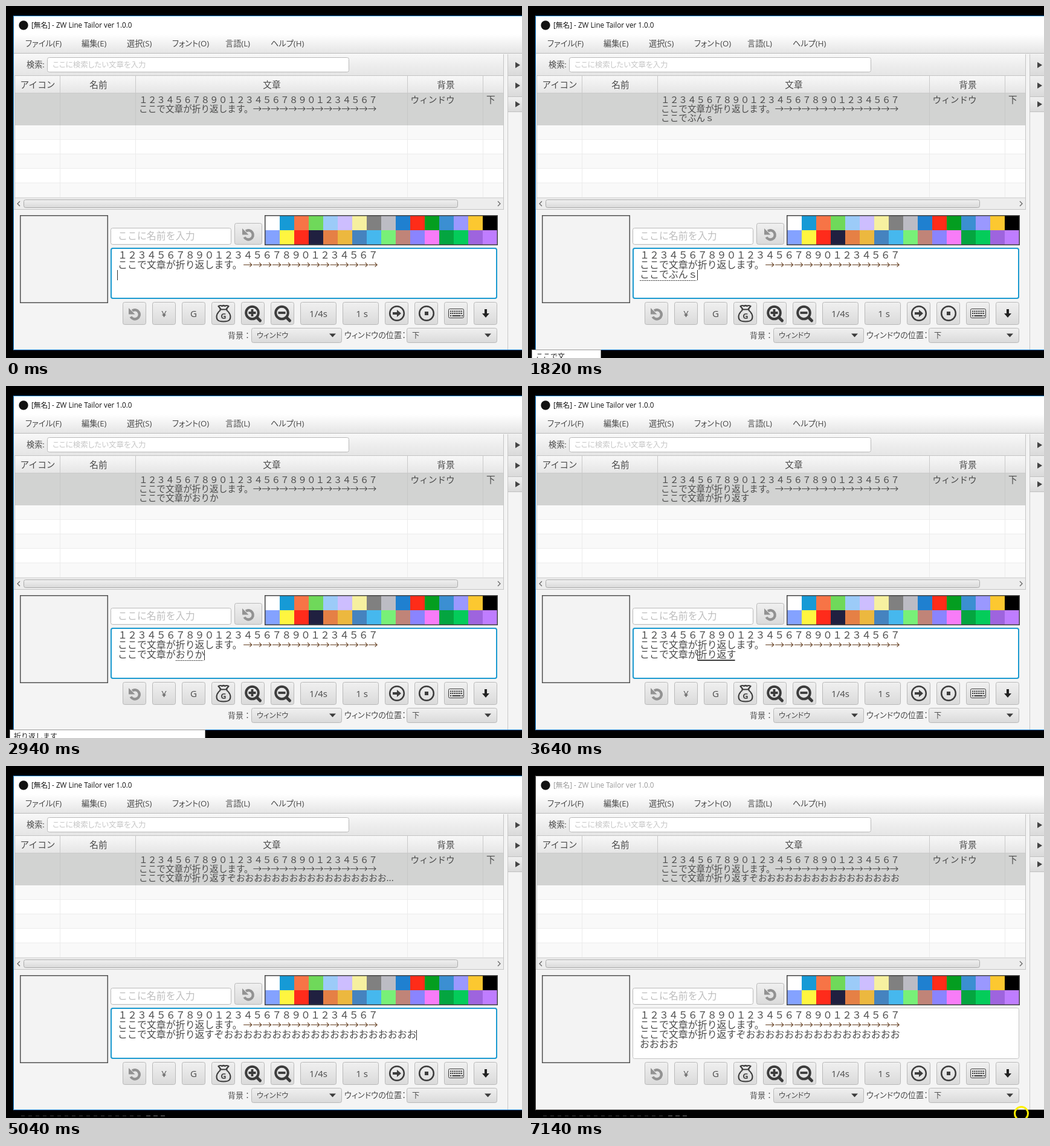
An HTML page for the animation above (7.28 s loop, 854 px wide and 584 px high).

```html
<!DOCTYPE html>
<html lang="ja">
<head>
<meta charset="utf-8">
<title>Text editor typing</title>
<style>
  html, body { margin: 0; width: 100%; height: 100%; overflow: hidden; background: #000; }
  svg { display: block; width: 854px; height: 584px; }
  text { font-family: "Noto Sans CJK JP", "Noto Sans", sans-serif; font-weight: 300; fill: #4a4a4a; white-space: pre; }
  .ui { font-family: "Open Sans", "Noto Sans CJK JP", sans-serif; font-weight: 400; font-feature-settings: "palt"; }
</style>
</head>
<body>
<svg id="stage" viewBox="0 0 854 584">
  <defs>
    <linearGradient id="bar" x2="0" y2="1"><stop stop-color="#fff"/><stop offset="1" stop-color="#e4e4e4"/></linearGradient>
    <linearGradient id="head" x2="0" y2="1"><stop stop-color="#f8f8f8"/><stop offset="1" stop-color="#e5e5e5"/></linearGradient>
    <linearGradient id="btn" x2="0" y2="1"><stop stop-color="#f0f0f0"/><stop offset="1" stop-color="#dadada"/></linearGradient>
  </defs>
</svg>
<script>
const stage = document.getElementById('stage');
const LOOP = 7280, CELL = 15.96, ROW_CELL = 14.63;
const EDGE = '#b9b9b9', INK = '#3c3c3c';

function add(tag, attrs) {
  const node = document.createElementNS('http://www.w3.org/2000/svg', tag);
  for (const key in attrs) node.setAttribute(key, attrs[key]);
  return stage.appendChild(node);
}
const box = (x, y, width, height, fill, more) => add('rect', { x, y, width, height, fill, ...more });
const frame = (x, y, w, h, fill, stroke = EDGE, rx = 3, line = 1) =>
  box(x + line / 2, y + line / 2, w - line, h - line, fill, { stroke, rx, 'stroke-width': line });
const path = (d, more) => add('path', { d, fill: 'none', stroke: INK, ...more });
const solid = (d, fill = INK) => path(d, { fill, stroke: 'none' });
const hline = (x, y, w, color) => box(x, y, w, 1, color);
const vline = (x, y, h, color) => box(x, y, 1, h, color);
function label(x, y, size, str, more = {}) {
  const node = add('text', { x, y, 'font-size': size, ...more });
  node.textContent = str;
  return node;
}
const ui = (x, y, size, str, more) => label(x, y, size, str, { class: 'ui', ...more });
const centered = { 'text-anchor': 'middle' };

// Window, title and menu
box(12, 16, 842, 555, '#f4f4f4');
box(13, 17, 841, 30, '#fff');
add('circle', { cx: 29, cy: 32, r: 7.7, fill: '#111' });
const title = ui(42, 36, 11.7, '[無名] - ZW Line Tailor ver 1.0.0');
box(13, 47, 841, 32, 'url(#bar)');
hline(13, 78, 841, '#bcbcbc');
[[32, 'ファイル(F)'], [125, '編集(E)'], [200, '選択(S)'], [275, 'フォント(O)'], [363, '言語(L)'], [438, 'ヘルプ(H)']]
  .forEach(([x, str]) => ui(x, 67, 13.2, str));

// Search
box(13, 79, 811, 36, 'url(#head)');
ui(34, 102, 13.2, '検索:');
frame(68, 85, 500, 25, '#fff');
ui(77, 102, 12.5, 'ここに検索したい文章を入力', { style: 'fill:#c6c6c6' });

// Table
box(14, 115, 809, 30, 'url(#head)');
hline(14, 115, 809, '#c4c4c4');
hline(14, 144, 809, '#c9c9c9');
box(14, 145, 809, 53, '#d2d3d2');
for (let i = 0; i < 5; i++) {
  const y = 198 + i * 24;
  box(14, y, 809, 24, i % 2 ? '#fff' : '#f9f9f9');
  hline(14, y + 23, 809, '#ededed');
}
for (const x of [89, 214, 664, 789]) {
  vline(x, 116, 29, '#c9c9c9');
  vline(x, 145, 53, '#c7c8c7');
  vline(x, 198, 120, '#ebebeb');
}
[[52.5, 'アイコン'], [153, '名前'], [440, '文章'], [728, '背景']]
  .forEach(([x, str]) => label(x, 136, ROW_CELL, str, centered));
const DIGITS = '１２３４５６７８９０１２３４５６７８９０１２３４５６７';
const SENTENCE = 'ここで文章が折り返します。', ARROWS = '→'.repeat(14);
label(220, 161, ROW_CELL, DIGITS);
label(220, 176, ROW_CELL, SENTENCE + ARROWS);
label(669.5, 161, ROW_CELL, 'ウィンドウ');
label(795, 161, ROW_CELL, '下');
const rowText = label(220, 191, ROW_CELL, '');

// Scroll bar
box(14, 318, 809, 19, '#ededed');
hline(14, 318, 809, '#d4d4d4');
hline(13, 337, 811, '#c4c4c4');
frame(29, 321, 719, 14, 'url(#btn)', '#ababab');
path('M23 324l-4 4 4 4M814 324l4 4-4 4', { stroke: '#666', 'stroke-width': 1.3 });
vline(14, 115, 223, '#c8c8c8');

// Split divider and collapsed side panels
vline(823, 80, 258, '#c4c4c4');
vline(830, 80, 490, '#c8c8c8');
for (const [y, h, mid] of [[80, 35, 98], [116, 34, 132], [151, 24, 163]]) {
  box(831, y, 23, h, 'url(#btn)');
  hline(831, y + h, 23, '#c0c0c0');
  solid(`M843 ${mid - 5}l8 5-8 5z`, '#444');
}

// Icon slot, name field and palette
frame(23, 347, 146, 146, '#f3f3f3', '#505050', 0, 1.5);
frame(173, 368, 200, 28, '#fff');
label(185, 387, CELL, 'ここに名前を入力', { style: 'fill:#bdbdbd' });
const button = (x, y, w, h) => frame(x, y, w, h, 'url(#btn)');
button(378, 360, 46, 36);
[
  'fff 169ad6 f77446 6fd95a 9ccbf8 cdbeff f6f0a0 808080 bcbcc4 1f80d0 ff2c18 049e20 3b8fd2 9a98ff fcc830 000',
  '84a2ff fff540 ff2b1b 202040 e58045 ecb83f 4583bf 46b8ee 78f078 c08478 8a84ff f87cf8 04a540 04cc5a 9e64de bf7dff'
].forEach((row, j) => row.split(' ').forEach((color, i) =>
  box(429 + i * 24, 348 + j * 24, 24, 24, '#' + color)));
frame(428, 347, 386, 50, 'none', '#444', 0, 1.5);

// Text area
const area = frame(173, 401, 640, 85, '#fff', '#c4c4c4');
const focusRing = frame(173, 401, 640, 85, 'none', '#1b9ad0', 3, 2);
label(185, 419, CELL, DIGITS);
label(185, 435, CELL, SENTENCE);
label(185 + 13 * CELL, 435, CELL, ARROWS, { style: 'fill:#6a4629' });
const line3 = label(185, 451, CELL, '');
const line4 = label(185, 467, CELL, '');
const underline = path('', {});
const caret = box(184, 438, 1, 17, '#333');

// Tool buttons
[193, 242, 291, 340, 389, 438].forEach(x => button(x, 491, 39, 38));
[487, 557].forEach(x => button(x, 491, 60, 38));
[627, 676, 725, 774].forEach(x => button(x, 491, 39, 38));
[[261.5, '¥'], [310.5, 'G'], [517, '1/4s'], [589, '1 s']]
  .forEach(([x, str]) => ui(x, 516, 15, str, centered));

function undoIcon(x, y) {
  path(`M${x - 6.5} ${y + 4.5}A7.6 7.6 0 1 0 ${x - 4} ${y - 5.5}`, { stroke: '#929292', 'stroke-width': 4.4 });
  solid(`M${x - 10} ${y - 10}v10.500h10.500z`, '#929292');
}
undoIcon(401, 379);
undoIcon(213, 511);

path('M355.500 503l-4-5q4-2 6 0 2.500-2 5 0 2-2 6 0l-4 5M353.500 503.500h13M355 504.500c-6 5-8 11-5 16q2 3 10 3t10-3c3-5 1-11-5-16',
  { 'stroke-width': 2.2, 'stroke-linejoin': 'round' });
ui(360, 518.5, 13, 'G', { ...centered, style: 'font-weight:700' });

function lens(x, sign) {
  add('circle', { cx: x, cy: 509, r: 10.3, fill: 'none', stroke: INK, 'stroke-width': 4 });
  path(`M${x + 8} 517l5 5`, { 'stroke-width': 5, 'stroke-linecap': 'round' });
  path(sign, { 'stroke-width': 3.8 });
}
lens(407.5, 'M401.500 509h12M407.500 503v12');
lens(456.5, 'M450.500 509h12');

for (const cx of [647, 696])
  add('circle', { cx, cy: 510, r: 11.8, fill: 'none', stroke: INK, 'stroke-width': 2.5 });
solid('M640 508h7v-4l7 6-7 6v-4h-7z');
box(693, 507, 6, 6, INK);
frame(732, 502, 26, 16, 'none', INK, 2);
path('M735 506.5h20M735 510h20', { 'stroke-width': 2, 'stroke-dasharray': '2 1' });
path('M735 514h2m1.500 0h14m1.500 0h2', { 'stroke-width': 2 });
solid('M792 503h4v7h4l-6 7-6-7h4z', '#222');

// Bottom selectors
function combo(x, str) {
  frame(x, 534, 150, 25, 'url(#btn)');
  ui(x + 9, 551, 12.3, str);
  solid(`M${x + 129} 543.500h11l-5.500 6z`);
}
ui(367, 551, 13, '背景：', { style: 'font-feature-settings:normal' });
combo(406, 'ウィンドウ');
ui(560, 551, 13.2, 'ウィンドウの位置：');
combo(663, '下');

// Window edge, suggestion popup, leftovers below the window
const edge = path('M854 16.500H12.500V570.500H854', {});
const popup = box(6.5, 570.5, 0, 20, '#fff', { stroke: '#999' });
const popupText = label(13, 586, 12, '', { style: 'fill:#222' });
const popupNote = label(0, 585, 10, 'ひらがな', { style: 'fill:#999' });
const specks = path('M25 580.500H226', { stroke: '#3c3c3c', 'stroke-dasharray': '6 6' });
const brightSpecks = path('M232 580.500H264', { stroke: '#777', 'stroke-dasharray': '7 5' });
const pointer = add('circle', { cx: 816.5, cy: 576.5, r: 11, fill: 'none', stroke: '#fff000', 'stroke-width': 3 });

// [start, settled text, text being composed, suggestion, popup right edge]
const A = 'ここで文章', B = A + 'が', C = B + '折り返す';
const drag = (at, n) => [at, C, 'ぞ' + 'お'.repeat(n), 'ぞ' + 'お'.repeat(Math.max(1, n - 1)), 0];
const FULL = C + 'ぞ' + 'お'.repeat(20);
const steps = [
  [0, '', ''],
  [840, '', 'ｋ'],
  [980, '', 'こ', 'こちら', 120],
  [1120, '', 'ここ', 'ここで', 304],
  [1260, '', 'ここｄ', 'ここで', 304],
  [1400, '', 'ここで', 'ここで', 120],
  [1540, '', 'ここでｂ', 'ここで', 120],
  [1680, '', 'ここでぶ', 'ここで文', 120],
  [1820, '', 'ここでぶんｓ', 'ここで文', 120],
  [1960, '', 'ここでぶんしょ', 'ここで文章', 351],
  [2100, '', 'ここでぶんしょう', 'ここで文章', 351],
  [2380, '', A],
  [2520, A, 'が'],
  [2660, B, 'お', '折り返し', 329],
  [2800, B, 'おり', '折り返し', 329],
  [2940, B, 'おりか', '折り返します', 329],
  [3080, B, 'おりかえ', '折り返します', 329],
  [3220, B, 'おりかえｓ', '折り返します', 329],
  [3360, B, 'おりかえす', '折り返す', 380],
  [3640, B, '折り返す'],
  [3780, C, 'ｚ'],
  drag(3920, 1), drag(4200, 2), drag(4340, 5), drag(4480, 9),
  drag(4620, 13), drag(4760, 17), drag(4900, 20),
  [5040, FULL, '']
];

const show = (node, on) => node.setAttribute('visibility', on ? 'visible' : 'hidden');
const set = (node, attrs) => { for (const key in attrs) node.setAttribute(key, attrs[key]); };

function render(t) {
  const [at, settled, composing, hint, right] = steps.findLast(step => step[0] <= t);
  const text = settled + composing;
  const wrapped = t >= 5320, active = t < 7140;

  line3.textContent = wrapped ? text.slice(0, 27) : text;
  line4.textContent = wrapped ? text.slice(27) : '';
  rowText.textContent = wrapped ? text.slice(0, 27) : text.length > 29 ? text.slice(0, 28) + '...' : text;

  const converted = at === 2380 || at === 3640;
  const from = 185 + settled.length * CELL, to = 185 + text.length * CELL;
  set(underline, {
    d: composing ? `M${from} ${converted ? 455 : 455.5}H${to - 2}` : '',
    'stroke-width': converted ? 2 : 1,
    'stroke-dasharray': converted ? 'none' : '2 1'
  });

  const blinkOff = (t >= 420 && t < 840) || (t >= 5740 && t < 6300) || t >= 6720;
  show(caret, !blinkOff);
  set(caret, { x: wrapped ? 184 : Math.round((converted ? from : to) - 1), y: wrapped ? 406 : 438 });

  const noted = right === 0;
  const end = noted ? 70 + 12 * hint.length : right;
  show(popup, hint);
  show(popupNote, noted);
  popupText.textContent = hint || '';
  if (hint) {
    set(popup, { width: end - 6 });
    set(popupNote, { x: end - 43 });
  }

  show(specks, t >= 5040);
  show(brightSpecks, t >= 5040);
  show(pointer, !active);
  show(focusRing, active);
  set(edge, { stroke: active ? '#1883d7' : '#444' });
  title.style.fill = active ? '#111' : '#999';
}

function tick() {
  render(performance.now() % LOOP);
  requestAnimationFrame(tick);
}
tick();
</script>
</body>
</html>
```
